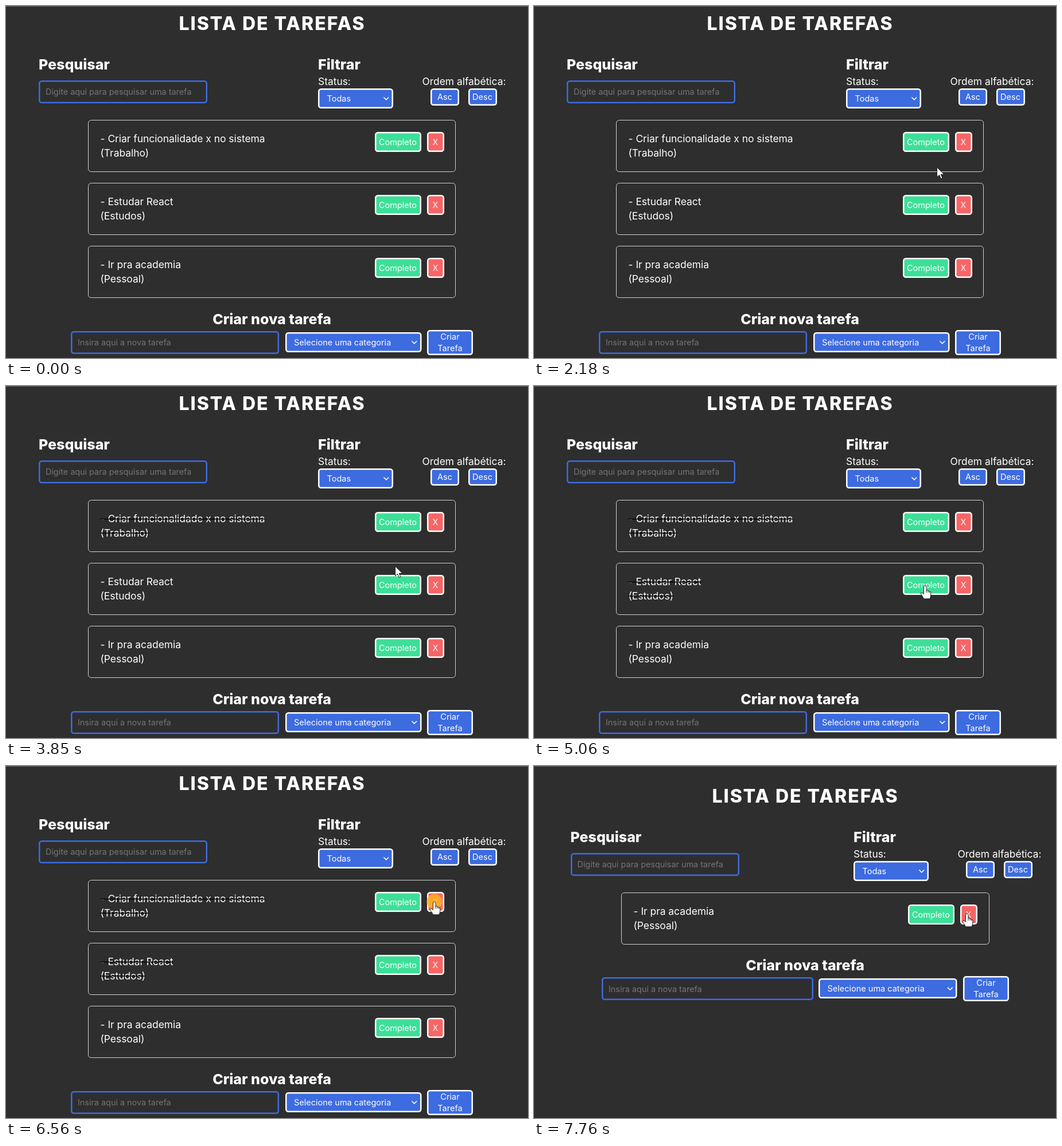
These frames come from a looping animation (910x615 px, 8 s). An HTML page:

```html
<!DOCTYPE html>
<html lang="pt-BR">
<head>
<meta charset="utf-8">
<title>Lista de tarefas</title>
<style>
  html, body { margin: 0; width: 100%; height: 100%; overflow: hidden; background: #2e2e2e; }
  svg { display: block; width: 100%; height: 100%; }
  text { font: 17.4px Inter, sans-serif; fill: #fff; white-space: pre; }
  .title { font-size: 32px; font-weight: 800; letter-spacing: 2px; }
  .head { font-size: 25px; font-weight: 800; }
  .ctl { font-size: 14.5px; }
  .hint { font-size: 14.4px; fill: #757575; }
  .mid { text-anchor: middle; }
  .field, .blue, .green, .red { stroke: #fff; stroke-width: 2.5; }
  .field { fill: none; stroke: #3d6be0; }
  .blue { fill: #3d6be0; }
  .green { fill: #3ddf98; }
  .red { fill: #f76565; }
  .card { fill: none; stroke: #d2d2d2; }
  .chevron { fill: none; stroke: #fff; stroke-width: 1.6; }
  .strike { stroke: #000; stroke-width: 1.5; }
  .cursor { fill: #fff; stroke: #111; stroke-width: .9; stroke-linejoin: round; }
</style>
</head>
<body>
<svg viewBox="0 0 910 615">
  <g id="page"></g>
  <circle id="click" r="13.5" fill="#ffb81c" fill-opacity=".8"/>
  <g id="cursor" class="cursor">
    <path id="arrow" d="M0 0V17L4 13.2L6.8 19.6L9.4 18.5L6.7 12.3H12.3Z"/>
    <path id="hand" d="M-2.5 2Q-2.5 0-.3 0Q2 0 2 2V8Q4.3 7 5 9Q7 8.4 7.5 10.2Q9.8 9.8 9.8 12V16Q9.8 19 8 22.8H-2.5Q-4 19-7 15.5Q-8.5 13-7 12Q-5 11.5-2.5 14.5ZM2 8v4M5 9v3M7.5 10v2.5"/>
  </g>
</svg>
<script>
const LOOP = 8000, TICK = 69, PRESS = 135, PITCH = 110.3;
const byId = id => document.getElementById(id);
const page = byId('page'), click = byId('click'), cursor = byId('cursor');
const arrow = byId('arrow'), hand = byId('hand');

const TASKS = [
  { name: 'Criar funcionalidade x no sistema', group: 'Trabalho', done: 3140, gone: 6690 },
  { name: 'Estudar React', group: 'Estudos', done: 4400, gone: 7760 },
  { name: 'Ir pra academia', group: 'Pessoal', done: Infinity, gone: Infinity }
];
const ACTIONS = TASKS.flatMap(task => [task.done, task.gone]);

// Each run glides from a to b, easing out; bow bends it sideways
const MOVES = [
  { from: 1210, to: 1980, a: [899, 598], b: [733, 338], bow: 0 },
  { from: 2050, to: 2660, a: [712, 312], b: [688, 236], bow: 0 },
  { from: 3650, to: 4130, a: [687, 247], b: [681, 348], bow: -5 },
  { from: 5060, to: 5340, a: [682, 349], b: [685, 327], bow: 0 },
  { from: 5870, to: 6490, a: [685, 325], b: [747, 237], bow: 0 },
  { from: 7150, to: 7560, a: [746, 239], b: [755, 258], bow: 0 }
];

const text = (x, y, str, cls = '') => `<text x="${x}" y="${y}" class="${cls}">${str}</text>`;
const box = (x, y, w, h, cls) =>
  `<rect x="${Math.round(x) + 1.25}" y="${Math.round(y) + 1.25}" width="${w - 2.5}" height="${h - 2.5}" rx="4" class="${cls}"/>`;
const button = (x, y, w, h, label, cls = 'blue') =>
  box(x, y, w, h, cls) + text(x + w / 2, y + h / 2 + 5, label, 'ctl mid');
const field = (x, y, w, hint) => box(x, y, w, 40, 'field') + text(x + 12, y + 25.5, hint, 'hint');
const select = (x, y, w, label) => box(x, y, w, 35, 'blue') + text(x + 15.5, y + 22.8, label, 'ctl') +
  `<path class="chevron" d="M${x + w - 16.5} ${y + 15.5}l4.3 4.3 4.3-4.3"/>`;

// Without a scrollbar (fewer than three tasks) everything sits further right and down
function layout(visible) {
  const short = visible.length < 3 ? 1 : 0;
  return { short, dx: 9 * short, dy: 22 * short };
}

function card(task, i, { short, dx, dy }, t) {
  const y = Math.floor(199 + dy + i * PITCH), x = 164.5 + dx;
  const mark = t >= task.done ? 'struck' : '';
  return `<rect x="${143.5 + dx}" y="${y + .5}" width="${640 + short}" height="90" rx="5" class="card"/>` +
    text(x, y + 39, '- ' + task.name, mark) + text(x, y + 63.5, `(${task.group})`, mark) +
    button(642.5 + dx, y + 21, 81, 35, 'Completo', 'green') +
    button(733.5 + dx, y + 21, 30, 35, 'X', 'red');
}

function drawPage(visible, t) {
  const l = layout(visible), { short, dx, dy } = l;
  const left = 57 + 6.5 * short, right = 544 + 13 * short;
  const formX = 113 + 5 * short, formY = 566 + dy - (3 - visible.length) * PITCH;
  const createX = 734 + 14 * short;
  page.innerHTML =
    '<path d="M0 .5H910" stroke="#686868"/>' +
    text(464 + dx, 42 + dy, 'LISTA DE TAREFAS', 'title mid') +
    text(left, 110.5 + dy, 'Pesquisar', 'head') +
    field(left, 129.5 + dy, 294, 'Digite aqui para pesquisar uma tarefa') +
    text(right, 110.5 + dy, 'Filtrar', 'head') +
    text(right, 138 + dy, 'Status:') +
    select(right, 144 + dy, 131, 'Todas') +
    text(right + 181.5, 138 + dy, 'Ordem alfabética:') +
    button(right + 196, 144 + dy, 50, 30, 'Asc') +
    button(right + 261.5, 144 + dy, 50, 30, 'Desc') +
    visible.map((task, i) => card(task, i, l, t)).join('') +
    text(463.5 + dx, formY - 10, 'Criar nova tarefa', 'head mid') +
    field(formX, formY + 1.7, 363 + 6 * short, 'Insira aqui a nova tarefa') +
    select(486.5 + 9.5 * short, formY + 4, 237.5 + 4 * short, 'Selecione uma categoria') +
    box(createX, formY, 80, 44, 'blue') +
    text(createX + 40, formY + 17, 'Criar', 'ctl mid') +
    text(createX + 40, formY + 36.5, 'Tarefa', 'ctl mid');

  for (const el of page.querySelectorAll('.struck')) {
    const x = el.getAttribute('x'), y = el.getAttribute('y') - 5.5;
    el.insertAdjacentHTML('afterend',
      `<path class="strike" d="M${x} ${y}h${el.getComputedTextLength()}"/>`);
  }
}

function position(t) {
  const move = MOVES.findLast(m => t >= m.from);
  if (!move) return null;
  const { from, to, a, b, bow } = move;
  const steps = Math.round((to - from) / TICK);
  const u = Math.min(1, Math.floor((t - from) / (to - from) * steps + .1) / steps);
  const e = 1 - (1 - u) ** 2;
  const [x, y] = a.map((v, k) => v + (b[k] - v) * e);
  return [x + bow * 4 * e * (1 - e), y];
}

function overButton([x, y], visible) {
  const { dx, dy } = layout(visible), px = x - dx;
  const inColumn = (px > 642 && px < 724) || (px >= 734 && px < 764);
  return inColumn && visible.some((_, i) => {
    const py = y - dy - i * PITCH;
    return py >= 220 && py <= 255;
  });
}

let shown = '';
function render(t) {
  const visible = TASKS.filter(task => t < task.gone);
  const key = visible.map(task => task.group + (t >= task.done)).join();
  if (key !== shown) {
    shown = key;
    drawPage(visible, t);
  }
  const pos = position(t);
  const pressed = ACTIONS.some(at => t >= at - PRESS && t < at);
  cursor.style.display = pos ? '' : 'none';
  click.style.display = pressed ? '' : 'none';
  if (!pos) return;
  const place = `translate(${pos})`;
  cursor.setAttribute('transform', place);
  click.setAttribute('transform', place);
  const over = overButton(pos, visible);
  arrow.style.display = over ? 'none' : '';
  hand.style.display = over ? '' : 'none';
}

const start = performance.now();
function tick() {
  render((performance.now() - start) % LOOP);
  requestAnimationFrame(tick);
}
tick();
</script>
</body>
</html>
```
